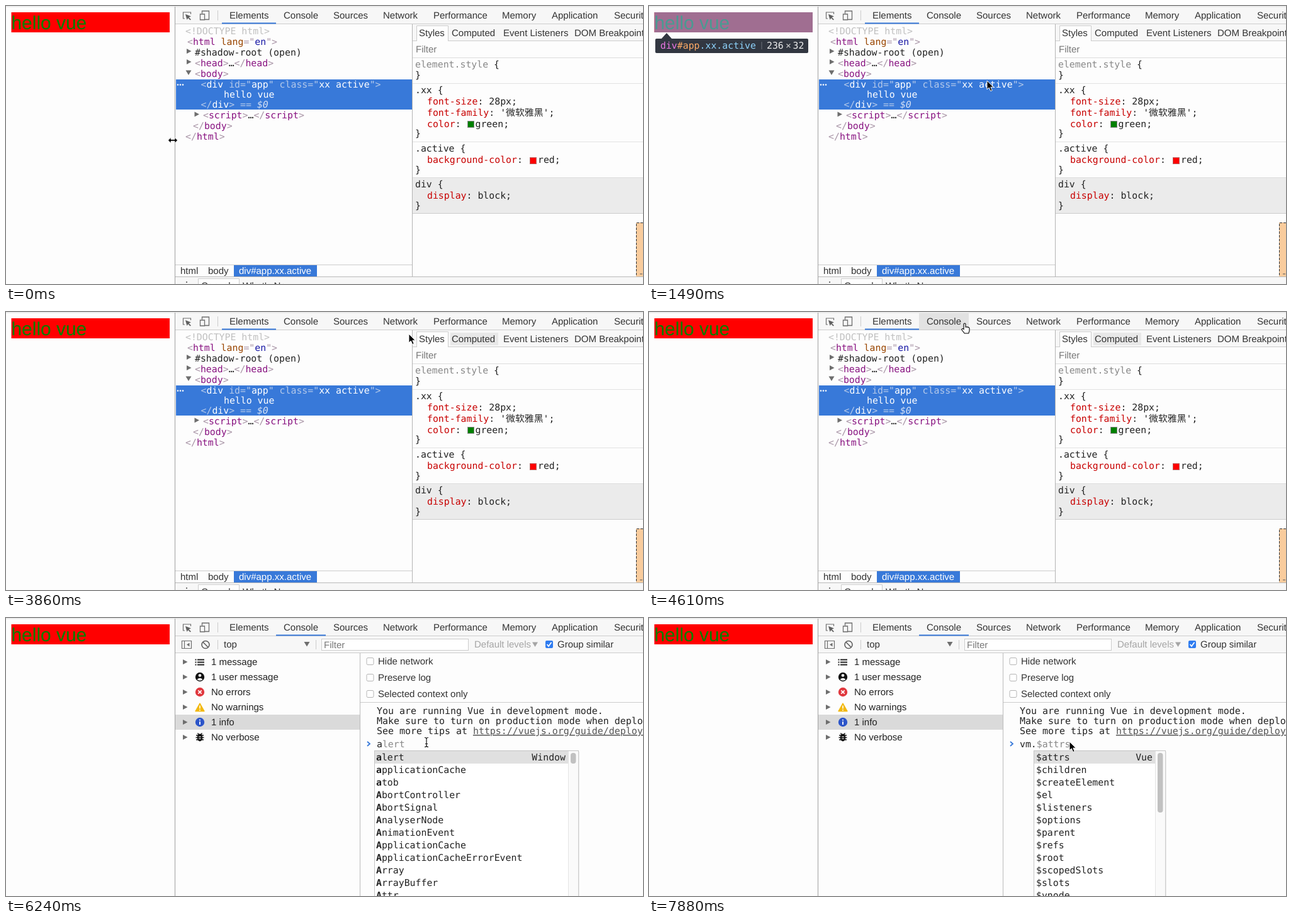
Animation of 1012x443 px, one loop 8000 ms. Source, as an HTML page:

```html
<!DOCTYPE html>
<html lang="en">
<head>
<meta charset="utf-8">
<title>Inspecting a Vue page</title>
<style>
  html, body { margin: 0; width: 100%; height: 100%; overflow: hidden; background: #fdfdfd; }
  svg { display: block; width: 100vw; height: 100vh; }
  text { font: 15px "Liberation Sans", Arial, sans-serif; fill: #333; white-space: pre; text-rendering: geometricPrecision; }
  .mono { font: 14.85px "DejaVu Sans Mono", "Noto Sans CJK SC", "Noto Sans CJK", monospace; fill: #222; }
  #log .mono { font-size: 14.95px; }
</style>
</head>
<body>
<svg id="stage" viewBox="0 0 1012 443" xmlns="http://www.w3.org/2000/svg"></svg>
<script>
const BLUE = '#3879d9', BAR = '#f7f7f7', LINE = '#ccc', PANE = '#fdfdfd';
const CHAR = 8.94;
const esc = s => s.replace(/&/g, '&amp;').replace(/</g, '&lt;').replace(/ /g, '\u00a0');
const rect = (x, y, w, h, fill, extra = '') =>
  `<rect x="${x}" y="${y}" width="${w}" height="${h}" fill="${fill}" ${extra}/>`;
const path = (d, stroke, width = 1, fill = 'none', extra = '') =>
  `<path d="${d}" fill="${fill}" stroke="${stroke}" stroke-width="${width}" ${extra}/>`;
const hline = (x1, x2, y, c = LINE) => path(`M${x1} ${y}H${x2}`, c);
const vline = (x, y1, y2, c = LINE) => path(`M${x} ${y1}V${y2}`, c);
const label = (x, y, s, fill = '#333') => `<text x="${x}" y="${y}" style="fill:${fill}">${esc(s)}</text>`;
// Each part is plain text or [text, colour, extra style].
const code = (x, y, ...parts) => `<text class="mono" x="${x}" y="${y}">` + parts.map(p => {
  const [s, fill = '#222', css = ''] = [].concat(p);
  return `<tspan style="fill:${fill};${css}">${esc(s)}</tspan>`;
}).join('') + '</text>';
const group = (id, body) => `<g id="${id}">${body}</g>`;
const right = (x, y, c = '#6e6e6e') => path(`M${x} ${y - 4}L${x + 7.5} ${y}L${x} ${y + 4}Z`, 'none', 0, c);
const down = (x, y, c = '#6e6e6e') => path(`M${x} ${y - 3.5}H${x + 9}L${x + 4.5} ${y + 4}Z`, 'none', 0, c);

// Page being inspected
function page() {
  return rect(0, 0, 268, 443, PANE) + rect(8.5, 10, 251.5, 32, 'red') +
    `<text x="8.5" y="36.5" style="font-size:29.9px;fill:green">hello vue</text>` +
    group('highlight',
      rect(8.5, 10, 251.5, 32, '#6fa8dc', 'opacity=".66"') +
      path('M19 53L28 43L37 53Z', 'none', 0, '#323741') + rect(10, 52, 243, 23, '#323741', 'rx="2"') +
      code(18, 68, ['div', '#ee78e6'], ['#app', '#ffab66'], ['.xx.active', '#8ed3fb']) +
      vline(179, 57, 69, '#6d727b') +
      code(187, 68, ['236', '#eee']) + code(217, 68, ['×', '#ccc']) + code(228.5, 68, ['32', '#eee']));
}

const TABS = [['Elements', 355], ['Console', 441], ['Sources', 520], ['Network', 599],
  ['Performance', 679], ['Memory', 788], ['Application', 867], ['Security', 966]];

function toolbar() {
  return rect(269, 0, 743, 28, BAR) + hline(0, 1012, 1, '#dedede') +
    path('M284 20H281.5V10H293.5V13', '#6e6e6e', 1.2) +
    path('M285 13L294 16.5L290.5 18L294 21.5L292.5 22.5L289.3 19.2L287.5 22Z', 'none', 0, '#5f5f5f') +
    path('M311.5 12V8H322.5V21.5H316', '#6e6e6e', 1.3) + path('M308.5 13H315.5V22H308.5Z', '#6e6e6e', 1.3) +
    vline(336.5, 7, 23) + rect(429, 2, 79, 26, '#e2e2e2', 'id="tabHover"') +
    hline(269, 1012, 28.5) + TABS.map(([s, x]) => label(x, 20, s)).join('') +
    rect(343, 26.5, 86, 2, BLUE, 'id="slider"');
}

const MARK = '#a894a6', TAG = '#881280', ATTR = '#994500', VALUE = '#1a1aa6';
const tag = name => [['<', MARK], [name, TAG], ['>', MARK]];
const close = name => [['</', MARK], [name, TAG], ['>', MARK]];

function tree() {
  const dim = '#b4c9ea', lit = '#fff', q = ['"', dim];
  return rect(269, 29, 376, 383, PANE) + rect(270, 117, 375, 48, BLUE) +
    code(285, 45, ['<!DOCTYPE html>', '#c0c0c0']) +
    code(288, 62, ['<', MARK], ['html', TAG], [' lang', ATTR], ['="', MARK], ['en', VALUE], ['">', MARK]) +
    right(287, 72) + code(300, 79, '#shadow-root (open)') +
    right(287, 89) + code(300, 96, ...tag('head'), '…', ...close('head')) +
    down(285.5, 106) + code(300, 113, ...tag('body')) +
    [273, 277, 281].map(x => `<circle cx="${x}" cy="125.5" r="1.3" fill="#fff"/>`).join('') +
    code(309.5, 130, ['<', dim], ['div', lit], [' id=', dim], q, ['app', lit], q,
      [' class=', dim], q, ['xx active', lit], q, ['>', dim]) +
    code(346, 146, ['hello vue', lit]) +
    code(309.5, 162, ['</', dim], ['div', lit], ['>', dim], [' == ', dim], ['$0', '#d5e1f5', 'font-style:italic']) +
    right(299.5, 172.5) + code(313, 179, ...tag('script'), '…', ...close('script')) +
    code(297, 196, ...close('body')) + code(285, 213, ...close('html')) +
    hline(269, 645, 412.5) + rect(362, 413, 132, 18, BLUE) +
    label(277, 427, 'html') + label(321, 427, 'body') + label(370, 427, 'div#app.xx.active', '#fff');
}

const prop = (y, name, value) => code(669, y, [name, '#c80000'], ': ' + value);

function styles() {
  return rect(645, 29, 367, 402, PANE) + rect(646, 29, 366, 27, BAR) + hline(645, 1012, 55.5) +
    rect(706, 33, 76, 20, '#e8e8e8', 'id="computedHover"') +
    path('M652.5 56V31.5H702.5V56', LINE, 1, PANE) +
    [['Styles', 656], ['Computed', 708], ['Event Listeners', 790], ['DOM Breakpoints', 903]]
      .map(([s, x]) => label(x, 48, s)).join('') +
    label(651, 74, 'Filter', '#777') + hline(646, 1012, 82.5, '#ddd') +
    code(650, 98, ['element.style', '#888'], ' {') + code(650, 115, '}') + hline(646, 1012, 123.5, '#e2e2e2') +
    code(650, 139, '.xx {') + prop(157, 'font-size', '28px;') + prop(175, 'font-family', "'微软雅黑';") +
    prop(193, 'color', '') + rect(733.5, 183.5, 10, 10, 'green', 'stroke="#888"') + code(745.5, 193, 'green;') +
    code(650, 208, '}') + hline(646, 1012, 216.5, '#e2e2e2') +
    code(650, 232, '.active {') + prop(250, 'background-color', '') +
    rect(832.5, 241.5, 10, 10, 'red', 'stroke="#b66"') + code(845, 250, 'red;') + code(650, 266, '}') +
    rect(646, 273, 366, 57, '#ebebeb') + hline(646, 1012, 273.5, '#ddd') + hline(646, 1012, 330.5) +
    code(650, 289, 'div {') + prop(307, 'display', 'block;') + code(650, 323, '}') +
    rect(1001, 345, 11, 86, '#f9cc9d') + path('M1012 345.5H1001.5V431', '#333', 1, 'none', 'stroke-dasharray="4 2"') +
    hline(1007, 1011, 427, '#555') + vline(645.5, 29, 431, '#b4b4b4');
}

function drawer() {
  return rect(269, 431, 743, 12, BAR) + hline(269, 1012, 431.5, '#b8b8b8') +
    rect(286, 439, 2, 2, '#6e6e6e') + path('M305.5 443V434.5H370.5V443', LINE, 1, PANE) +
    label(310, 451, 'Console') + label(376, 451, "What's New");
}

function sideIcons() {
  const dot = (y, c) => `<circle cx="308" cy="${y}" r="7.2" fill="${c}"/>`;
  return path('M304 66.5H315M304 70.5H315M304 74.5H315', '#222', 2) +
    path('M300.5 66.5H302.5M300.5 70.5H302.5M300.5 74.5H302.5', '#222', 2) +
    dot(94, '#111') + '<circle cx="308" cy="91.5" r="2.3" fill="#fff"/>' +
    path('M303.5 98Q308 93.5 312.5 98Q308 101.5 303.5 98Z', 'none', 0, '#fff') +
    dot(118, '#e0383e') + path('M305.3 115.3L310.7 120.7M310.7 115.3L305.3 120.7', '#fff', 1.7) +
    path('M308 136L315 148.5H301Z', '#f2b90f', 1.4, '#f2b90f', 'stroke-linejoin="round"') +
    path('M308 139.5V144.5M308 146V147.8', '#fff', 1.6) +
    dot(166, '#2c55c9') + path('M308 165V170M308 161.8V163.6', '#fff', 1.8) +
    '<ellipse cx="308" cy="190.5" rx="4.2" ry="6" fill="#111"/>' +
    path('M302 187H314M301.5 190.5H314.5M302 194H314M304.5 183.5L306.5 186M311.5 183.5L309.5 186', '#111', 1.5) +
    path('M306 189.3H310M306 192.3H310', '#fff', 1.1);
}

function consolePane() {
  const names = ['1 message', '1 user message', 'No errors', 'No warnings', '1 info', 'No verbose'];
  const box = y => rect(573, y, 11, 11, '#fff', 'stroke="#b5b5b5" rx="2"');
  return rect(269, 29, 743, 414, PANE) + rect(269, 29, 743, 26, BAR) + hline(269, 1012, 55.5) +
    path('M279.5 36.5H294.5V48.5H279.5ZM283.5 36.5V48.5', '#6e6e6e', 1.2) +
    path('M291.5 39.5L287 42.5L291.5 45.5Z', 'none', 0, '#6e6e6e') +
    '<circle cx="317" cy="42.5" r="6" fill="none" stroke="#5f5f5f" stroke-width="1.6"/>' +
    path('M312.8 38.3L321.2 46.7', '#5f5f5f', 1.6) + vline(336.5, 35, 50) +
    label(346, 47, 'top') + down(473.5, 41.5) + vline(492.5, 35, 50) +
    rect(501.5, 33.5, 233, 18, '#fff', 'stroke="#ccc"') + label(505, 48, 'Filter', '#777') +
    label(744, 47, 'Default levels', '#a5a5a5') + down(836, 42, '#a5a5a5') +
    rect(857, 36, 12, 12, '#2f7cf0', 'rx="2"') + path('M859.5 42L862 45L866.5 38.8', '#fff', 1.7) +
    label(876, 47, 'Group similar') +
    rect(269, 154, 293, 24, '#dadada') +
    names.map((s, i) => right(281, 70 + 24 * i) + label(326, 75 + 24 * i, s, '#222')).join('') +
    sideIcons() + vline(562.5, 56, 443, '#bbb') +
    ['Hide network', 'Preserve log', 'Selected context only']
      .map((s, i) => box(63.5 + 26 * i) + label(591, 74 + 26 * i, s)).join('') +
    hline(563, 1012, 134.5) +
    group('log',
      code(589, 153, 'You are running Vue in development mode.') +
      code(589, 169, 'Make sure to turn on production mode when deploying for production.') +
      code(589, 185, 'See more tips at ',
        ['https://vuejs.org/guide/deployment.html', '#545454', 'text-decoration:underline'])) +
    path('M574 197L578 200.5L574 204', BLUE, 1.8) +
    '<g id="prompt"></g>' + rect(589, 193, 1.3, 16, '#111', 'id="caret"');
}

// Completion list hanging below the prompt
function popup(id, x, w, textX, items, owner, thumb, boldLen) {
  const end = x + w, track = end - 16;
  return group(id,
    rect(x - .5, 211.5, w + 1, 240, '#fff', 'stroke="#c4c4c4"') + vline(end + 1.2, 213, 443, '#e0e0e0') +
    rect(x, 212, track - x, 20, '#e0e0e0') + rect(track, 212, 16, 231, '#fafafa') +
    vline(track + .5, 212, 443, '#e4e4e4') + rect(end - 12, 215, 8.5, thumb, '#c1c1c1', 'rx="4"') +
    items.split(' ').map((s, i) => code(textX, 227 + 20 * i,
      [s.slice(0, boldLen), '#222', 'font-weight:bold'], s.slice(boldLen))).join('') +
    code(track - 4 - owner.length * CHAR, 227, owner));
}

const CURSORS = {
  arrow: path('M0 0V14L3.3 11L5.7 16.6L8.2 15.5L5.8 10.2H10.2Z', '#fff', 1, '#000'),
  resize: path('M-7.5 0L-3 -4.5V-1.3H3V-4.5L7.5 0L3 4.5V1.3H-3V4.5Z', '#fff', .8, '#000'),
  hand: path('M0 1.5C0 -.6 3 -.6 3 1.5V6C6 5.5 8.8 6.2 9 8V12L7.8 16H1.2L-3 10.5C-3.8 8.8 -1.6 7.6 0 9.5Z',
    '#000', 1.1, '#fff'),
  beam: path('M-3 -7.5Q0 -7.5 0 -5.5Q0 -7.5 3 -7.5M0 -5.5V5.5M-3 7.5Q0 7.5 0 5.5Q0 7.5 3 7.5M-2 2.5H2', '#111', 1.2)
};

const stage = document.getElementById('stage');
stage.innerHTML = rect(0, 0, 1012, 443, PANE) + page() + toolbar() +
  group('elements', tree() + styles() + drawer()) +
  group('console', consolePane() +
    popup('globals', 586, 323, 588, 'alert applicationCache atob AbortController AbortSignal AnalyserNode ' +
      'AnimationEvent ApplicationCache ApplicationCacheErrorEvent Array ArrayBuffer Attr', 'Window', 17, 1) +
    popup('members', 612, 208, 615, '$attrs $children $createElement $el $listeners $options $parent ' +
      '$refs $root $scopedSlots $slots $vnode', 'Vue', 95, 0)) +
  vline(268.5, 1, 443, '#a0a0a0') +
  group('cursor', Object.entries(CURSORS).map(([k, v]) => group(k, v)).join(''));

const $ = id => document.getElementById(id);
const show = (id, on) => $(id).setAttribute('display', on ? 'inline' : 'none');

const LOOP = 8000, TICK = 148.6;
const STOPS = [[0, 265, 214], [1, 298, 206], [4, 445, 156], [6, 535, 130], [8, 558, 121], [10, 537, 119],
  [13, 628, 148], [16, 574, 129], [17, 569, 127], [18, 569, 127], [20, 605, 190], [22, 660, 340],
  [23, 780, 280], [24, 808, 150], [25, 750, 40], [26, 640, 35], [29, 525, 38], [30, 506, 27],
  [31, 500, 18], [32, 500, 18], [34, 620, 165], [35, 688, 224], [36, 668, 198], [52, 668, 198], [53, 668, 197]];

function pointer(n) {
  const i = Math.max(1, STOPS.findIndex(s => s[0] >= n));
  const [n0, x0, y0] = STOPS[i - 1], [n1, x1, y1] = STOPS[i];
  const k = (n - n0) / (n1 - n0);
  return [x0 + (x1 - x0) * k, y0 + (y1 - y0) * k];
}

// [from tick, typed, suggested]
const TYPING = [[0, '', ''], [38, 'a', 'lert'], [45, '', ''], [46, 'v', ''], [47, 'vm', ''], [50, 'vm.', '$attrs']];

function render(t) {
  const n = Math.min(53, Math.floor((t + 8) / TICK));
  const inConsole = n >= 32;
  const [x, y] = pointer(n);
  const overTab = x > 429 && x < 508 && y < 28;
  show('elements', !inConsole);
  show('console', inConsole);
  show('highlight', n > 0 && !inConsole && x > 270 && x < 645 && y >= 117 && y < 165);
  show('tabHover', overTab);
  show('computedHover', n >= 25);

  const slider = $('slider');
  slider.setAttribute('x', n < 32 ? 343 : n === 32 ? 411 : 429);
  slider.setAttribute('width', n < 32 ? 86 : n === 32 ? 81 : 79);

  const [, typed, hint] = TYPING.filter(s => s[0] <= n).pop();
  $('prompt').innerHTML = code(589, 206, typed, [hint, '#888']);
  $('caret').setAttribute('x', 589 + typed.length * CHAR);
  show('caret', n >= 36 && !(n >= 42 && n < 45) && n < 53);
  show('globals', typed === 'a');
  show('members', typed === 'vm.');

  const kind = n === 0 ? 'resize' : overTab ? 'hand' : n >= 34 && n < 53 ? 'beam' : 'arrow';
  for (const k in CURSORS) show(k, k === kind);
  $('cursor').setAttribute('transform', `translate(${x.toFixed(1)} ${y.toFixed(1)})`);
}

function loop() {
  render(performance.now() % LOOP);
  requestAnimationFrame(loop);
}
loop();
</script>
</body>
</html>
```
